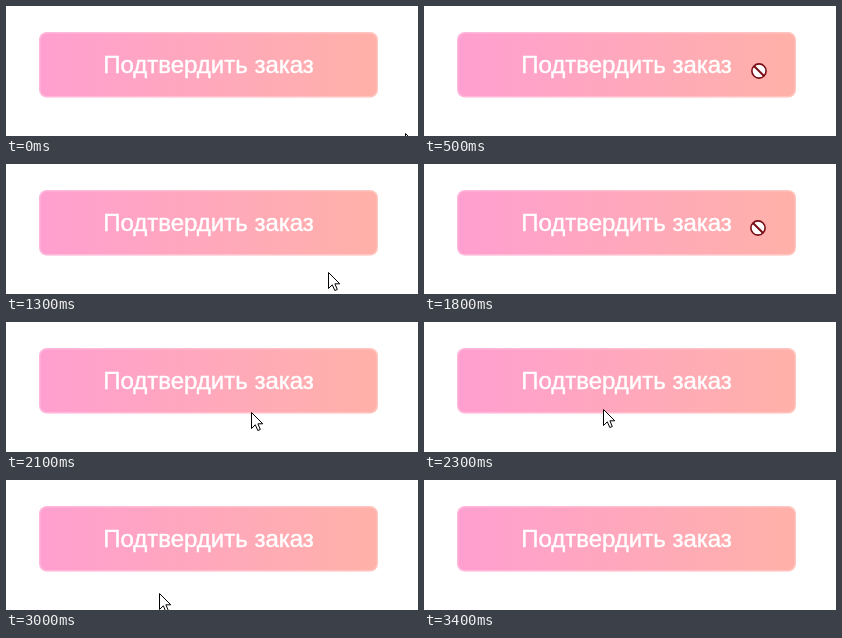
An HTML page for the animation above (3900 ms loop, 412 by 130 pixels).

```html
<!DOCTYPE html>
<html lang="ru">
<head>
<meta charset="utf-8">
<title>Disabled button</title>
<style>
  html, body { margin: 0; width: 100%; height: 100%; overflow: hidden; background: #fff; }
  svg { display: block; }
  text {
    font: 24px "Liberation Sans", Arial, sans-serif;
    text-anchor: middle;
    fill: #fff;
    stroke: #fff;
    stroke-width: .45px;
  }
</style>
</head>
<body>
<svg width="412" height="130" viewBox="0 0 412 130">
  <defs>
    <linearGradient id="fill">
      <stop offset="0" stop-color="#ff9fd0"/>
      <stop offset="1" stop-color="#ffb1a8"/>
    </linearGradient>
  </defs>
  <rect x="33" y="26" width="339" height="65.5" rx="8" fill="url(#fill)"/>
  <rect x="33.75" y="26.75" width="337.5" height="64" rx="7.25" fill="none" stroke="#fff" stroke-opacity=".25" stroke-width="1.5"/>
  <text x="202.5" y="67">Подтвердить заказ</text>
  <g id="cursor">
    <path id="arrow" d="M.5 .5V16.5L4.3 12.8L6.8 18.5L9.3 17.5L6.9 11.8H11.8Z" fill="#fff" stroke="#000"/>
    <g id="blocked" stroke="#780c14">
      <circle r="7.1" fill="#fff" stroke-width="1.6"/>
      <path d="M-5 -5L5 5" stroke-width="2"/>
    </g>
  </g>
</svg>
<script>
  const LOOP = 3900, STEP = 100;
  const BUTTON_TOP = 26, BUTTON_BOTTOM = 87;
  const ENTRY = [399, 127];
  // Each leg is a quadratic curve; the pointer rests between legs
  const legs = [
    { from: 0, to: 600, bend: [345, 80], end: [328, 56] },
    { from: 800, to: 1300, bend: [332, 102], end: [322, 108] },
    { from: 1400, to: 1800, bend: [340, 88], end: [334, 64] },
    { from: 1900, to: 2500, bend: [183, 124], end: [136, 56] },
    { from: 2600, to: 3000, bend: [165, 105], end: [153, 113] },
    { from: 3100, to: 3400, bend: [164, 118], end: [190, 140] }
  ];
  const [cursor, arrow, blocked] = ["cursor", "arrow", "blocked"].map(id => document.getElementById(id));
  const show = (el, on) => el.setAttribute("visibility", on ? "visible" : "hidden");
  const curve = (a, b, c, p) => (1 - p) ** 2 * a + 2 * p * (1 - p) * b + p * p * c;
  const begin = performance.now();

  function pointerAt(t) {
    const i = legs.findLastIndex(leg => leg.from <= t);
    const { from, to, bend, end } = legs[i];
    const start = i ? legs[i - 1].end : ENTRY;
    const p = Math.min(1, (t - from) / (to - from));
    return start.map((a, k) => Math.round(curve(a, bend[k], end[k], p)));
  }

  function draw() {
    const t = (performance.now() - begin) % LOOP;
    const [x, y] = pointerAt(Math.floor(t / STEP) * STEP);
    const inside = y > BUTTON_TOP && y < BUTTON_BOTTOM;
    cursor.setAttribute("transform", `translate(${x} ${y})`);
    show(arrow, !inside);
    show(blocked, inside);
    requestAnimationFrame(draw);
  }
  draw();
</script>
</body>
</html>
```
